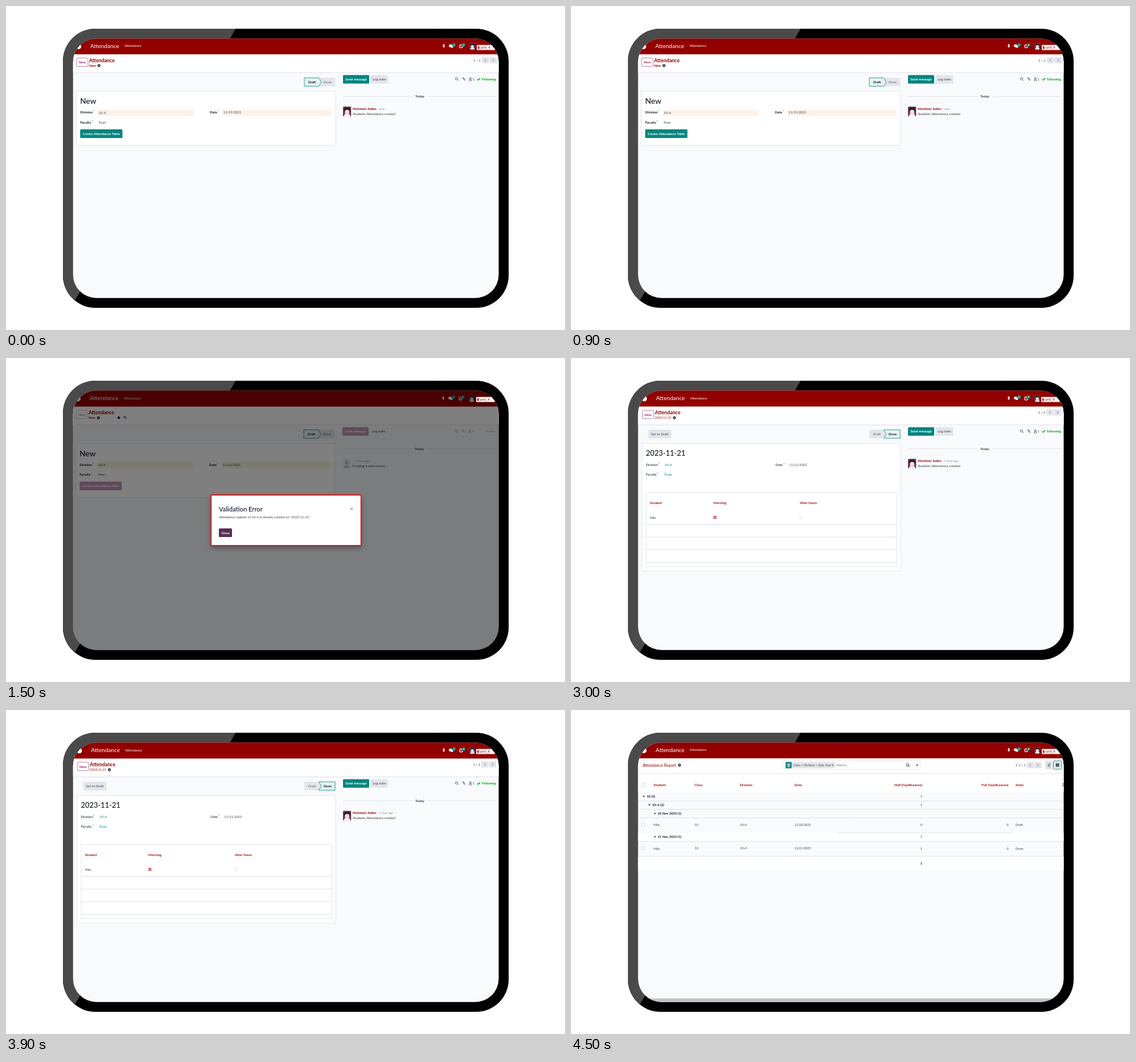
These frames come from a looping animation (982 px wide and 570 px high, 6 s). An HTML page with a canvas:

```html
<!DOCTYPE html>
<html lang="en">
<head>
<meta charset="utf-8">
<title>Attendance</title>
<style>
html, body { margin: 0; width: 100%; height: 100%; overflow: hidden; background: #fff; }
canvas { display: block; width: 982px; height: 570px; }
</style>
</head>
<body>
<canvas id="stage"></canvas>
<script>
const W = 982, H = 570, HOLD = 1500;
const RED = '#930000', TEAL = '#05857f', INK = '#374151', DARK = '#111827',
      GREY = '#e3e5eb', LINE = '#dfe2e7', BODY = '#f8fafc', MUTED = '#9299a5';
const canvas = document.getElementById('stage');
const c = canvas.getContext('2d');
const ratio = window.devicePixelRatio || 1;
canvas.width = W * ratio;
canvas.height = H * ratio;

function rect(x, y, x2, y2, fill) {
  c.fillStyle = fill;
  c.fillRect(x, y, x2 - x, y2 - y);
}

function box(x, y, x2, y2, r, fill, stroke, width = 1) {
  c.beginPath();
  c.roundRect(x, y, x2 - x, y2 - y, r);
  if (fill) { c.fillStyle = fill; c.fill(); }
  if (stroke) { c.strokeStyle = stroke; c.lineWidth = width; c.stroke(); }
}

// Text whose capitals are centred on y
function text(s, x, y, size = 6, color = INK, weight = 400, align = 'left', family = 'Lato, "Open Sans"') {
  c.font = `${weight} ${size}px ${family}, sans-serif`;
  c.textAlign = align;
  c.textBaseline = 'alphabetic';
  c.fillStyle = color;
  c.fillText(s, x, y + size * 0.36);
}

function path(points, color, width = 1, fill = false) {
  c.beginPath();
  points.forEach(([x, y], i) => i ? c.lineTo(x, y) : c.moveTo(x, y));
  if (fill) { c.closePath(); c.fillStyle = color; c.fill(); }
  else { c.strokeStyle = color; c.lineWidth = width; c.stroke(); }
}

function hline(x, x2, y, color = LINE, width = 1) {
  path([[x, y], [x2, y]], color, width);
}

function disc(x, y, r, color) {
  c.beginPath();
  c.arc(x, y, r, 0, 7);
  c.fillStyle = color;
  c.fill();
}

function ring(x, y, r, color, width = 1) {
  c.beginPath();
  c.arc(x, y, r, 0, 7);
  c.strokeStyle = color;
  c.lineWidth = width;
  c.stroke();
}

function gear(x, y, color = DARK) {
  ring(x, y, 1.7, color, 1.3);
  for (let i = 0; i < 8; i++) {
    const a = i * Math.PI / 4;
    disc(x + 2.2 * Math.cos(a), y + 2.2 * Math.sin(a), 0.55, color);
  }
}

function lens(x, y, color) {
  ring(x - 0.6, y - 0.6, 2.1, color, 0.9);
  path([[x + 1, y + 1], [x + 3, y + 3]], color, 1);
}

function caret(x, y) {
  path([[x - 2, y - 1], [x + 2, y - 1], [x, y + 1.3]], DARK, 1, true);
}

function button(label, x, y, x2, y2, fill, color, weight = 700) {
  box(x, y, x2, y2, 1.5, fill);
  text(label, (x + x2) / 2, (y + y2) / 2, 6, color, weight, 'center');
}

function avatar(x, y, w, h) {
  c.save();
  c.beginPath();
  c.roundRect(x, y, w, h, 1.5);
  c.clip();
  rect(x, y, x + w, y + h, '#6a3350');
  c.translate(x, y);
  c.scale(w / 15, h / 17);
  box(2, 2, 13, 10, 4, '#241a24');
  box(3.5, 5.5, 11.5, 14, 3.5, '#efd9d2');
  box(2, 13, 13, 20, 3, '#f1eef0');
  c.restore();
}

function pager(label, x, y, bx) {
  text(label, x, y, 6, INK);
  box(bx, y - 5.5, bx + 12.5, y + 5.5, 1, GREY);
  box(bx + 13.5, y - 5.5, bx + 26, y + 5.5, 1, GREY);
  path([[bx + 7.5, y - 2.5], [bx + 5, y], [bx + 7.5, y + 2.5]], '#5b6472', 0.8);
  path([[bx + 18.5, y - 2.5], [bx + 21, y], [bx + 18.5, y + 2.5]], '#5b6472', 0.8);
}

function dbTag(x) {
  box(x, 68.5, x + 33, 77.5, 1, '#fbf1ee');
  rect(x + 2, 71, x + 4.6, 75.5, '#a51d1d');
  text('unit_4', x + 6.5, 73, 5.6, '#7d2626', 400, 'left', '"DejaVu Sans"');
}

function topBar(dx, right, y) {
  rect(110, 50, 870, 85 + (y - 70), RED);
  disc(127.5 + dx, y + 1.3, 4.6, '#fff');
  text('Attendance', 148 + dx, y, 10.1, '#fff');
  text('Attendance', 208 + dx, y, 5.9, '#fff');
  c.save();
  c.translate(right, y - 70);
  box(767.4, 68.2, 770.6, 73, 1.4, '#f3dede');
  disc(769, 68, 1.2, '#f3dede');
  c.beginPath();
  c.ellipse(781, 70, 3, 2.4, 0, 0, 7);
  c.ellipse(783.4, 71.7, 2.4, 1.8, 0, 0, 7);
  c.fillStyle = '#fff';
  c.fill();
  ring(799.5, 70.8, 2.8, '#fff', 1.1);
  path([[799.5, 69.2], [799.5, 71], [801, 71]], '#fff', 0.7);
  for (const [x, n] of [[787, '5'], [804, '6']]) {
    disc(x, 68.3, 3.1, TEAL);
    text(n, x, 68.3, 4.2, '#fff', 700, 'center');
  }
  avatar(814, 65, 10.5, 11.5);
  c.restore();
}

function status(x, done) {
  const split = done ? 549.5 : x + 25.5, y = 126.3, y2 = 141.2, mid = 133.7;
  const on = '#e4f2f3';
  box(x, y, x + 54.5, y2, 1.5, GREY);
  const tip = split + 4.5;
  if (done) {
    path([[split, y], [x + 54, y], [x + 54, y2], [split, y2], [tip, mid]], on, 1, true);
    path([[split, y], [x + 54, y], [x + 54, y2], [split, y2], [tip, mid], [split, y]], TEAL, 0.8);
  } else {
    path([[x, y], [split, y], [tip, mid], [split, y2], [x, y2]], on, 1, true);
    path([[x, y], [split, y], [tip, mid], [split, y2], [x, y2], [x, y]], TEAL, 0.8);
  }
  text('Draft', x + 7, mid, 5.8, done ? '#5b6472' : DARK, done ? 400 : 700);
  text('Done', x + 34, mid, 5.8, done ? DARK : '#5b6472', done ? 700 : 400);
}

function label(s, x, y, weight, markX) {
  text(s, x, y, 6, DARK, weight);
  text('?', markX, y - 2.5, 4.4, '#19808a', 700);
}

function chatter(dx, o) {
  c.save();
  c.translate(dx, o.y || 0);
  button('Send message', 592, 121.5, 638, 136.5, o.faded ? '#c094b4' : TEAL, '#fff');
  if (!o.faded) box(640, 121.5, 671.5, 136.5, 1.5, GREY);
  text('Log note', 644.2, 129, 6.1, INK);
  const tone = o.faded ? '#a5a9b2' : '#4b5563';
  lens(792, 128.5, tone);
  path([[802, 126.5], [805.5, 131], [807, 130], [803.5, 125.5], [802.3, 126.3], [805, 129.7]], tone, 0.8);
  ring(815.7, 127, 1.5, tone, 0.8);
  box(813.5, 128.9, 818, 131.7, 1, null, tone, 0.8);
  text(o.faded ? '0' : '1', 819.7, 129, 6, tone);
  if (o.faded) {
    text('Follow', 844, 129, 5.8, '#a5a9b2');
  } else {
    path([[828.2, 128.8], [829.8, 130.5], [833, 126.7]], '#0a9b0a', 1.4);
    text('Following', 836, 128.7, 5.75, '#0a9b0a', 700);
  }
  hline(592, 714, 159.5);
  hline(741, 861, 159.5);
  text('Today', 727, 159.3, 6, INK, 700, 'center');
  if (o.faded) {
    box(592, 177, 607, 194, 1.5, '#eceef1');
    c.beginPath();
    c.ellipse(599.5, 183.5, 3, 4, 0, 0, 7);
    c.fillStyle = '#c3c6cc';
    c.fill();
    box(595, 188.5, 604, 194, 2.5, '#c3c6cc');
    text('- 1 hour ago', 610, 181, 5.6, MUTED);
  } else {
    avatar(592, 177, 14.5, 17);
    text('Mortimer Adlen', 609, 180.7, 5.85, RED, 700);
    text(o.ago, 651.5, 180.7, 5.4, MUTED);
  }
  text(o.message, 609, 190, 5.9, INK);
  c.restore();
}

function form(o) {
  const dx = o.dx, dy = o.dy;
  rect(110, 50, 870, 520, BODY);
  rect(110, 80, 870, 117 + dy, '#fff');
  hline(110, 870, 117.3 + dy);
  topBar(dx, o.right, 70 + dy);
  c.save();
  c.translate(dx, dy);
  box(124, 91.5, 144, 106.3, 1.5, '#fff', o.dirty ? '#c9bac7' : '#a9588c', 0.8);
  text('New', 134, 99, 6, o.dirty ? '#8d7588' : '#8d2f66', o.dirty ? 400 : 700, 'center');
  text('Attendance', 146, 95.7, 8.8, RED, 700);
  text(o.crumb, 146, 104.8, o.saved ? 5.4 : 5.7, RED, o.saved ? 400 : 700);
  gear(o.saved ? 180.3 : 163.3, 104.8);
  if (o.dirty) {
    box(196.6, 103.8, 201.6, 106.6, 1.3, DARK);
    disc(199, 103.6, 1.7, DARK);
    c.beginPath();
    c.arc(210.5, 104.5, 2, -2.6, 2);
    c.strokeStyle = DARK;
    c.lineWidth = 0.9;
    c.stroke();
    path([[207.6, 101.8], [207.6, 104.3], [210, 104.3]], DARK, 0.8);
  }
  c.restore();
  if (!o.dirty) pager(o.saved ? '1 / 2' : '1 / 1', 821 + o.right, 95.5 + dy, 836 + o.right);
  status(524 + o.right, o.saved);
  if (o.saved) button('Set to Draft', 136, 126.3, 176, 141.5, GREY, INK, 400);

  box(123.5 + dx, 150 + dy, 579 + o.right, o.saved ? 375 : 245 + dy, 1.5, '#fff', LINE, 0.9);
  c.save();
  c.translate(dx, dy);
  text(o.title, 130.3, 167.3, o.saved ? 12.9 : 13.7, DARK, 500);
  const bold = o.saved ? 400 : 700;
  if (!o.saved) {
    rect(161, 182.5, 330, 193.3, o.field);
    rect(380, 182.5, 572, 193.3, o.field);
  }
  label('Division', 130.3, 187.3, bold, 153);
  label('Faculty', 130.3, 204.5, bold, 150.3);
  label('Date', 358, 187.3, bold, 372);
  const link = o.saved ? TEAL : INK;
  text('10-A', 163, 187.5, 5.8, link);
  text('Evan', 163, 204.7, 6, link);
  text(o.date, 382, 187.5, 5.55, INK);
  if (!o.saved) {
    button('Create Attendance Table', 130.3, 217, 204.5, 232.2, o.dirty ? '#c094b4' : TEAL, '#fff');
  }
  c.restore();
  chatter(o.dirty ? -1 : 0, o.chat);
}

function blank() {
  form({
    dx: 0, dy: 0, right: 0, crumb: 'New', title: 'New', date: '11/19/2023', field: '#fdf1e8',
    chat: { ago: '- now', message: 'Students Attendance created' }
  });
  dbTag(827);
}

function failed() {
  form({
    dx: -1, dy: 0.5, right: -1, dirty: true, crumb: 'New', title: 'New', date: '11/21/2023',
    field: '#f8f5da', chat: { y: 0.3, faded: true, message: 'Creating a new record...' }
  });
  rect(110, 50, 870, 520, 'rgba(0,0,0,.5)');
  dbTag(826);
  c.save();
  c.shadowColor = 'rgba(0,0,0,.35)';
  c.shadowBlur = 9 * ratio;
  c.shadowOffsetY = 4 * ratio;
  box(360, 241, 624, 330, 2, '#fff');
  c.restore();
  box(360.3, 241, 623.7, 330, 1.5, '#fff', '#e8131b', 1.8);
  text('Validation Error', 374, 266, 11.2, DARK, 500);
  path([[604.3, 263], [609.5, 268.2]], '#6b7280', 0.9);
  path([[609.5, 263], [604.3, 268.2]], '#6b7280', 0.9);
  text('Attendance register of 10-A is already created on "2023-11-21"', 374, 279.5, 5.75, INK);
  button('Close', 374, 299.8, 397, 315, '#5a2f52', '#fff');
}

function saved() {
  form({
    dx: 1.3, dy: 0.4, right: 0, saved: true, crumb: '2023-11-21', title: '2023-11-21',
    date: '11/21/2023', chat: { y: 0.3, ago: '- 1 hour ago', message: 'Students Attendance created' }
  });
  rect(822, 87, 870, 104, '#fff');
  rect(815, 87, 822, 104, '#fff');
  pager('1 / 2', 820.5, 95.8, 835);
  dbTag(826);
  box(132, 236.5, 572.5, 367, 0, '#fff', LINE, 0.9);
  for (const y of [292.5, 315, 337.3, 359.7]) hline(132, 572.5, y, '#d9dce2');
  text('Student', 138.5, 255.2, 6.1, '#a31515', 700);
  text('Morning', 250, 255.2, 6.1, '#a31515', 700);
  text('After Noon', 401.7, 255.2, 6.1, '#a31515', 700);
  text('Mila', 138.5, 280.5, 5.6);
  box(250.3, 277.7, 255.5, 283, 0.8, '#d9525a');
  path([[251.5, 280.4], [252.6, 281.6], [254.5, 279]], '#fff', 0.8);
  box(401.8, 277.8, 406.3, 283, 0.8, '#fff', '#d5d8de', 0.7);
}

function check(y) {
  box(124.6, y - 3, 129.6, y + 3, 0.8, '#fff', '#c9cdd4', 0.7);
}

function group(title, x, y, n) {
  caret(x, y);
  text(title, x + 5, y, 5.8, DARK, 700);
  text(n, 617, y, 5.6, INK, 400, 'right');
}

function record(y, date, n, state) {
  check(y);
  text('Mila', 145, y, 5.6);
  text('10', 217, y, 5.5);
  text('10-A', 296.5, y, 5.5);
  text(date, 392.5, y, 5.2);
  text(n, 617, y, 5.6, INK, 400, 'right');
  text('0', 768.5, y, 5.6, INK, 400, 'right');
  text(state, 781, y, 5.6);
}

function report() {
  rect(110, 50, 870, 520, BODY);
  rect(110, 80, 870, 145, '#fff');
  topBar(0.6, 0, 70);
  dbTag(827);
  hline(110, 870, 112);
  text('Attendance Report', 126, 97, 7.1, RED);
  gear(190.5, 97);
  box(372.5, 89.5, 614, 104.3, 1.5, '#fff', '#e6e8ec', 0.8);
  box(377, 91.5, 464, 102.5, 1, GREY);
  rect(377, 91.5, 387.5, 102.5, TEAL);
  path([[379.3, 95.6], [382.2, 94.2], [385.2, 95.6], [382.2, 97]], '#fff', 1, true);
  path([[379.3, 97.2], [382.2, 98.6], [385.2, 97.2]], '#fff', 0.8);
  path([[379.3, 98.9], [382.2, 100.3], [385.2, 98.9]], '#fff', 0.8);
  text('Class > Division > Day: Day', 390.5, 97, 5.5);
  text('×', 459.5, 97, 6, DARK, 700, 'center');
  text('Search...', 466, 96.7, 5.8, '#6b7280');
  lens(592, 97.3, DARK);
  path([[601.5, 90], [601.5, 104]], '#e6e8ec', 0.8);
  caret(608, 97);
  pager('1-1 / 1', 780.5, 97, 800.5);
  box(833, 89.5, 846.5, 104.3, 1.5, GREY);
  rect(837.5, 94.5, 842.2, 100.3, '#a3a8b1');
  path([[838.5, 94.5], [840, 93], [842.2, 93], [842.2, 95]], '#a3a8b1', 1, true);
  box(847.5, 89.5, 861.5, 104.3, 1.5, '#dff0f1', TEAL, 0.8);
  for (let i = 0; i < 4; i++) hline(851.7, 857.6, 94.2 + i * 1.7, DARK, 1.1);

  box(124.3, 128.5, 130, 135, 0.8, '#fff', '#c9cdd4', 0.7);
  const heads = [['Student', 145], ['Class', 217], ['Division', 296.5], ['Date', 392.5], ['State', 781]];
  for (const [s, x] of heads) text(s, x, 131.5, 6.15, '#9d1010', 700);
  text('Half Day(#Leaves)', 617, 131.5, 6.15, '#9d1010', 700, 'right');
  text('Full Day(#Leaves)', 768.5, 131.5, 6.15, '#9d1010', 700, 'right');
  hline(863, 867, 130, DARK, 1);
  hline(863, 867, 133, DARK, 1);

  rect(110, 216, 870, 231, '#fff');
  rect(110, 257, 870, 282.5, '#fff');
  for (const y of [160, 174.8, 189.8, 231, 257.3]) hline(110, 870, y, '#dde0e6');
  hline(468, 775, 216, '#dde0e6');
  group('10 (2)', 128, 152, '1');
  group('10-A (2)', 137.7, 167, '1');
  group('20 Nov 2023 (1)', 147.3, 182.3, '');
  record(202.3, '11/20/2023', '0', 'Draft');
  group('21 Nov 2023 (1)', 147.3, 223.3, '1');
  record(243.5, '11/21/2023', '1', 'Done');
  text('1', 617, 269.5, 5.8, DARK, 700, 'right');
  rect(110, 507.3, 870, 514, '#c2c5c8');
}

const scenes = [blank, failed, saved, report];

function device(scene) {
  c.setTransform(ratio, 0, 0, ratio, 0, 0);
  rect(0, 0, W, H, '#fff');
  c.save();
  c.beginPath();
  c.roundRect(100, 40, 783, 491, 57);
  c.fillStyle = '#000';
  c.fill();
  c.clip();
  path([[90, 30], [409.5, 30], [403.5, 40], [121, 518], [90, 570]], '#4a4a4a', 1, true);
  c.restore();
  c.save();
  c.beginPath();
  c.roundRect(117.8, 57.3, 747.7, 456.4, 41);
  c.clip();
  scene();
  c.restore();
}

function tick(now) {
  device(scenes[Math.floor(now / HOLD) % scenes.length]);
  requestAnimationFrame(() => tick(performance.now() - start));
}

const start = performance.now();
tick(0);
</script>
</body>
</html>
```
